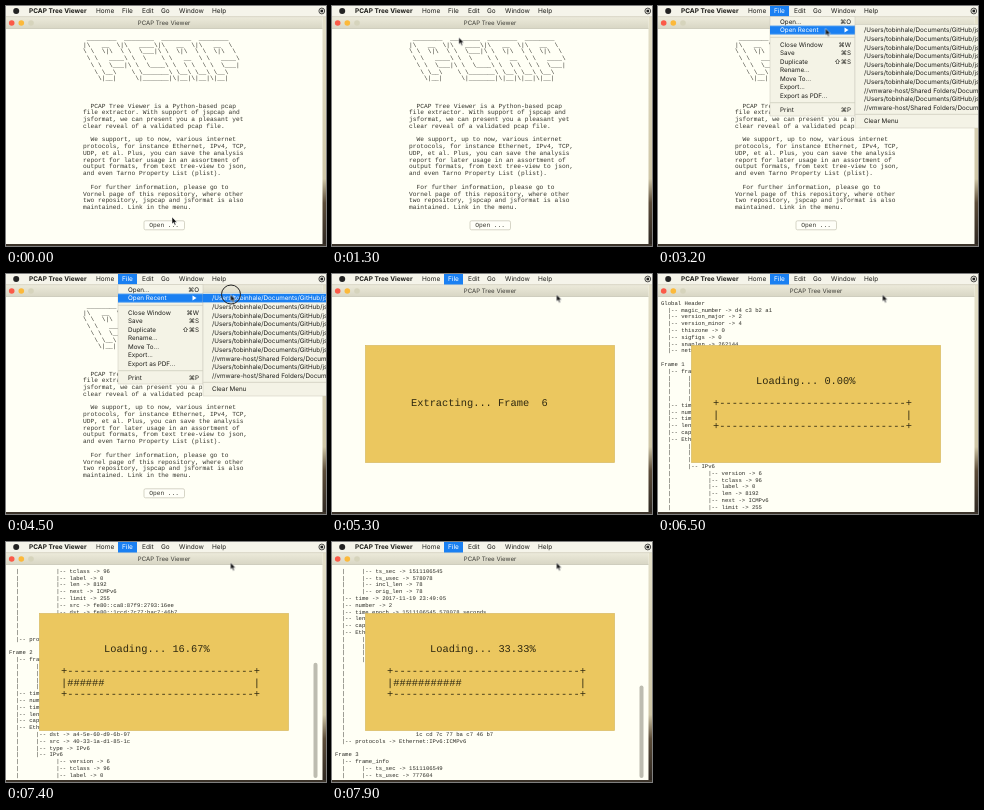
These frames come from a looping animation (320 by 240 pixels, 8000 ms). An HTML page:

```html
<!DOCTYPE html>
<html lang="en">
<head>
<meta charset="utf-8">
<title>PCAP Tree Viewer</title>
<style>
html, body { margin: 0; width: 100%; height: 100%; overflow: hidden; background: #fffff5; }
svg { display: block; width: 320px; height: 240px; }
text { white-space: pre; text-rendering: geometricPrecision; fill: #1c1c18; }
.ui text { font: 6.3px Inter, "DejaVu Sans", sans-serif; }
.ui .bar { font-size: 6.5px; }
.ui .app { font-size: 6.5px; font-weight: 700; }
.ui .title { font-size: 6.1px; fill: #3c3c36; }
.mono text { font-family: "Liberation Mono", "DejaVu Sans Mono", monospace; }
#intro text { font-size: 6.22px; fill: #34342c; }
#tree text { font-size: 5.62px; fill: #2c2c26; }
#panel text { font-size: 10.37px; fill: #2e2810; }
.end { text-anchor: end; }
.mid { text-anchor: middle; }
.blue { fill: #1a80f2; }
.sheet { fill: #f4f3e6; stroke: #c8c7b8; stroke-width: .5; }
.rule { stroke: #d6d5c6; stroke-width: 1; }

/* timed switches; 1% is 80 ms */
#intro, #menu, #fileBg, #fileText, #pick, .openRow, .recentRow, #sub, #subPick, .subRow, #click1, #click2, #panel, #extract, #load {
  animation: 8s step-end infinite;
}
#intro { animation-name: intro; }
#menu { animation-name: menu; }
#fileBg { animation-name: fileBg; }
#fileText { animation-name: fileText; }
#pick { animation-name: pick; }
.openRow { animation-name: openRow !important; }
.recentRow { animation-name: recentRow !important; }
#sub { animation-name: sub; }
#subPick { animation-name: subPick; }
.subRow { animation-name: subRow !important; }
#click1 { animation-name: click1; }
#click2 { animation-name: click2; }
#panel { animation-name: panel; }
#extract { animation-name: extract; }
#load { animation-name: load; }
#cursor { animation: cursor 8s ease-in-out infinite; }
@keyframes intro { 0% { visibility: visible } 59.4%, 100% { visibility: hidden } }
@keyframes menu { 0% { visibility: hidden } 21.25% { visibility: visible } 58.75%, 100% { visibility: hidden } }
@keyframes fileBg { 0% { visibility: hidden } 21.25%, 100% { visibility: visible } }
@keyframes fileText { 0% { fill: #1c1c18 } 21.25%, 100% { fill: #fff } }
@keyframes pick {
  0% { visibility: hidden; transform: none }
  26.25% { visibility: visible; transform: none }
  32.5% { visibility: visible; transform: translateY(8.6px) }
  58.75%, 100% { visibility: hidden; transform: none }
}
@keyframes openRow { 0% { fill: #1c1c18 } 26.25% { fill: #fff } 32.5%, 100% { fill: #1c1c18 } }
@keyframes recentRow { 0% { fill: #1c1c18 } 32.5% { fill: #fff } 58.75%, 100% { fill: #1c1c18 } }
@keyframes sub { 0% { visibility: hidden } 35.6% { visibility: visible } 58.75%, 100% { visibility: hidden } }
@keyframes subPick { 0% { visibility: hidden } 42.5% { visibility: visible } 58.75%, 100% { visibility: hidden } }
@keyframes subRow { 0% { fill: #1c1c18 } 42.5% { fill: #fff } 58.75%, 100% { fill: #1c1c18 } }
@keyframes click1 { 0% { visibility: hidden } 20.6% { visibility: visible } 23.1%, 100% { visibility: hidden } }
@keyframes click2 { 0% { visibility: hidden } 54.4% { visibility: visible } 58.1%, 100% { visibility: hidden } }
@keyframes panel { 0% { visibility: hidden } 60%, 100% { visibility: visible } }
@keyframes extract { 0% { visibility: hidden } 60% { visibility: visible } 67.76%, 100% { visibility: hidden } }
@keyframes load { 0% { visibility: hidden } 67.76%, 100% { visibility: visible } }
@keyframes cursor {
  0%, 8.75% { transform: translate(166px, 211px) }
  18.75%, 23% { transform: translate(121px, 5px) }
  27.5%, 31% { transform: translate(128px, 17.5px) }
  34.4%, 37.5% { transform: translate(150px, 23px) }
  45%, 100% { transform: translate(224.5px, 20.5px) }
}
</style>
</head>
<body>
<svg viewBox="0 0 320 240">
  <defs>
    <linearGradient id="desk" x2="0" y2="1">
      <stop offset="0" stop-color="#e6e2cc"/><stop offset=".72" stop-color="#cfc6a6"/>
      <stop offset=".82" stop-color="#5c4c38"/><stop offset="1" stop-color="#2c2620"/>
    </linearGradient>
    <linearGradient id="chrome" x2="0" y2="1">
      <stop offset="0" stop-color="#eceada"/><stop offset="1" stop-color="#d8d6c4"/>
    </linearGradient>
  </defs>
  <rect width="320" height="240" fill="url(#desk)"/>
  <rect y="238" width="320" height="2" fill="#3c342a"/>
  <rect y="11" width="316.5" height="227" fill="#fffff5"/>

  <g id="intro" class="mono">
    <rect x="138" y="214.8" width="40.5" height="9" rx="1.5" fill="#fffff8" stroke="#c4c3b2" stroke-width=".7"/>
  </g>
  <g id="tree" class="mono"></g>
  <rect id="thumb" x="307.5" width="4" rx="2" fill="#bdbcb0" visibility="hidden"/>

  <g id="panel" class="mono">
    <rect x="33.5" y="71.5" width="249" height="117" fill="#ebc75f" stroke="#d8b962" stroke-width=".7"/>
    <g id="extract"></g>
    <g id="load"></g>
  </g>

  <g class="ui">
    <rect y="11" width="316.5" height="11.5" fill="url(#chrome)"/>
    <path d="M0 22.5H316.5" stroke="#bdbbaa" stroke-width=".6"/>
    <circle cx="5.7" cy="17" r="2.8" fill="#fb5a48"/>
    <circle cx="15.3" cy="17" r="2.8" fill="#fcb93a"/>
    <circle cx="25" cy="17" r="2.8" fill="#d6d4bc"/>
    <text class="title mid" x="158" y="19.3">PCAP Tree Viewer</text>
    <rect width="320" height="10.5" fill="#f5f4ea"/>
    <path d="M0 10.7H320" stroke="#c6c4b4" stroke-width=".5"/>
    <circle cx="10.2" cy="5" r="3" fill="#222"/>
    <circle cx="315.8" cy="5" r="2.9" fill="none" stroke="#222" stroke-width=".8"/>
    <rect x="314.5" y="3.7" width="2.6" height="2.6" fill="#222"/>
    <rect id="fileBg" class="blue" x="112" width="19" height="10.5"/>
    <g id="bar"></g>
    <g id="menu">
      <path class="sheet" d="M112 10.5H197V110H112Z"/>
      <rect id="pick" class="blue" x="112" y="11.2" width="85" height="8.6"/>
      <path class="rule" d="M112 31.3H197M112 96.7H197"/>
      <path class="recentRow" d="M186.5 21.6L190.5 24.1L186.5 26.6Z"/>
    </g>
    <g id="sub">
      <path class="sheet" d="M197 18.5H321V122H197Z"/>
      <rect id="subPick" class="blue" x="197" y="19.8" width="123" height="8.6"/>
      <path class="rule" d="M197 108.3H320"/>
    </g>
  </g>

  <g fill="none" stroke="#222" stroke-width="1">
    <circle id="click1" cx="121" cy="6" r="9.5"/>
    <circle id="click2" cx="225" cy="20.5" r="9.5"/>
  </g>
  <path id="cursor" d="M0 0V7L1.6 5.6L2.7 8.2L3.9 7.7L2.8 5.2H5Z" fill="#111" stroke="#fff" stroke-width=".5"/>
</svg>
<script>
const $ = id => document.getElementById(id);
function label(box, x, y, str, cls = "") {
  const el = document.createElementNS("http://www.w3.org/2000/svg", "text");
  el.setAttribute("x", x);
  el.setAttribute("y", y);
  if (cls) el.setAttribute("class", cls);
  el.textContent = str;
  return $(box).appendChild(el);
}

// menu bar and menus
label("bar", 23, 7.3, "PCAP Tree Viewer", "app");
[["Home", 90], ["File", 116], ["Edit", 136], ["Go", 155], ["Window", 173], ["Help", 206]]
  .forEach(([name, x]) => {
    const el = label("bar", x, 7.3, name, "bar");
    if (name === "File") el.id = "fileText";
  });
[
  ["Open...", 15.5, "⌘O", "openRow"], ["Open Recent", 24.1, "", "recentRow"],
  ["Close Window", 38.2, "⌘W"], ["Save", 46.8, "⌘S"], ["Duplicate", 55.4, "⇧⌘S"],
  ["Rename...", 64], ["Move To...", 72.5], ["Export...", 81], ["Export as PDF...", 89.6],
  ["Print", 103.6, "⌘P"]
].forEach(([name, y, key, cls = ""]) => {
  label("menu", 122, y + 2.3, name, cls);
  if (key) label("menu", 193, y + 2.3, key, "end " + cls);
});
for (let i = 0; i < 10; i++) {
  const root = i === 7 || i === 9 ? "//vmware-host/Shared Folders/Documents" : "/Users/tobinhale/Documents/GitHub/jspcap";
  label("sub", 206, 26.4 + i * 8.6, root, i ? "" : "subRow");
}
label("sub", 206, 117.4, "Clear Menu");

// start page
const intro = String.raw`
 ________  ________  ________  ________
|\   __  \|\   ____\|\   __  \|\   __  \
\ \  \|\  \ \  \___|\ \  \|\  \ \  \|\  \
 \ \   ____\ \  \    \ \   __  \ \   ____\
  \ \  \___|\ \  \____\ \  \ \  \ \  \___|
   \ \__\    \ \_______\ \__\ \__\ \__\
    \|__|     \|_______|\|__|\|__|\|__|



  PCAP Tree Viewer is a Python-based pcap
file extractor. With support of jspcap and
jsformat, we can present you a pleasant yet
clear reveal of a validated pcap file.

  We support, up to now, various internet
protocols, for instance Ethernet, IPv4, TCP,
UDP, et al. Plus, you can save the analysis
report for later usage in an assortment of
output formats, from text tree-view to json,
and even Tarno Property List (plist).

  For further information, please go to
Vornel page of this repository, where other
two repository, jspcap and jsformat is also
maintained. Link in the menu.`;
intro.slice(1).split("\n").forEach((row, i) => label("intro", 77, 33.8 + i * 6.77, row));
label("intro", 143.2, 221.3, "Open ...");

// packet tree
const L1 = "  |-- ", L2 = "  |     |-- ", L3 = "  |           |-- ", RAW = "  |".padEnd(24);
const under = (lead, rows) => rows.map(row => lead + row);
function packet(n, sec, usec, clock, dst, src) {
  return [
    "Frame " + n, L1 + "frame_info",
    ...under(L2, ["ts_sec -> " + sec, "ts_usec -> " + usec, "incl_len -> 78", "orig_len -> 78"]),
    ...under(L1, ["time -> 2017-11-19 " + clock, "number -> " + n,
      `time_epoch -> ${sec}.${usec} seconds`, "len -> 78", "cap_len -> 78", "Ethernet"]),
    ...under(L2, ["dst -> " + dst, "src -> " + src, "type -> IPv6", "IPv6"]),
    ...under(L3, ["version -> 6", "tclass -> 96", "label -> 0", "len -> 8192", "next -> ICMPv6",
      "limit -> 255", "src -> fe80::ca8:87f9:2793:16ee", "dst -> fe80::1ccd:7c77:bac7:46b7", "ICMPv6 ->"]),
    ...under(RAW, ["88 00 7a 20 e0 00 00 00", "1c cd 7c 77 ba c7 46 b7"]),
    L1 + "protocols -> Ethernet:IPv6:ICMPv6", ""
  ];
}
const macA = "a4-5e-60-d9-6b-97", macB = "40-33-1a-d1-85-1c";
const lines = [
  "Global Header",
  ...under(L1, ["magic_number -> d4 c3 b2 a1", "version_major -> 2", "version_minor -> 4",
    "thiszone -> 0", "sigfigs -> 0", "snaplen -> 262144", "network -> 1"]),
  "",
  ...packet(1, 1511106545, 471719, "23:49:05", macB, macA),
  ...packet(2, 1511106545, 578078, "23:49:05", macA, macB),
  ...packet(3, 1511106549, 777604, "23:49:09", macB, macA)
];
const VIEW = 31;
const rows = Array.from({ length: VIEW }, (_, i) => label("tree", 3, 30.8 + i * 6.8, ""));

// progress panel
const counter = label("extract", 79, 132.3, "");
const percent = label("load", 98, 109.8, "");
const edge = "+" + "-".repeat(30) + "+";
label("load", 55, 132.3, edge);
const meter = label("load", 55, 143.8, "");
label("load", 55, 155.3, edge);

function showTree(count) {
  const top = Math.max(0, count - VIEW);
  rows.forEach((row, i) => row.textContent = top + i < count ? lines[top + i] : "");
  const thumb = $("thumb"), track = 212;
  thumb.setAttribute("visibility", top ? "visible" : "hidden");
  if (top) {
    thumb.setAttribute("y", 24 + track * top / count);
    thumb.setAttribute("height", track * VIEW / count);
  }
  const done = Math.max(0, Math.floor((count - 9) / 29));
  percent.textContent = `Loading... ${(done * 100 / 6).toFixed(2)}%`;
  meter.textContent = "|" + "#".repeat(done && done * 5 + 1).padEnd(30) + "|";
}

let start, shown = -1;
function tick(now) {
  start ??= now;
  const t = (now - start) % 8000;
  const step = Math.min(6, Math.max(1, 1 + Math.floor((t - 4800) / 80)));
  counter.textContent = "Extracting... Frame " + String(step).padStart(2);
  const count = t < 5421 ? 0 : Math.floor((t - 5421) * .0285) + 1;
  if (count !== shown) showTree(shown = count);
  requestAnimationFrame(tick);
}
requestAnimationFrame(tick);
</script>
</body>
</html>
```
